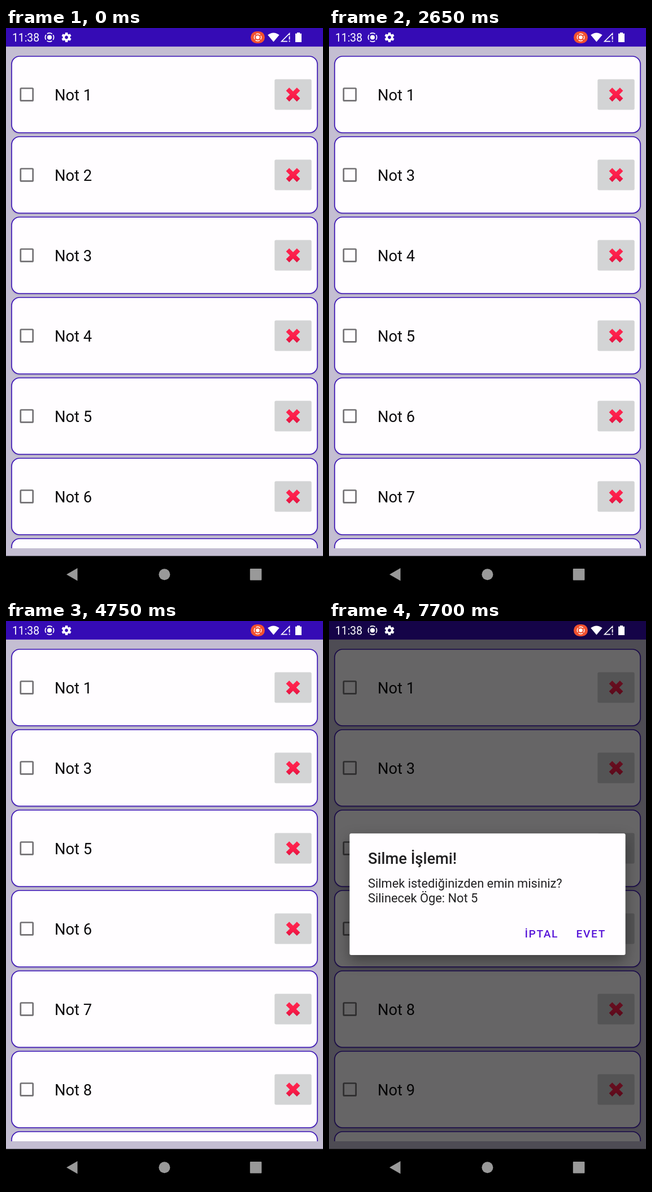
An HTML page that plays this animation: 561 by 998 pixels, repeating every 8000 ms.

```html
<!DOCTYPE html>
<html lang="tr">
<head>
<meta charset="utf-8">
<title>Notlar</title>
<style>
  html, body { margin: 0; width: 100%; height: 100%; overflow: hidden; background: #000; }
  svg { display: block; width: 100vw; height: 100vh; }
  text { font-family: Roboto, sans-serif; white-space: pre; }
  .label { font-size: 27.3px; fill: #0b0a0c; }
  .title { font-size: 27.3px; font-weight: 500; fill: #212022; }
  .message { font-size: 21.84px; fill: #212022; }
  .action { font-size: 19.1px; font-weight: 500; letter-spacing: .0893em; fill: #5614d8; }
  .clock { font-size: 19.3px; fill: #fff; }
  #panel { filter: drop-shadow(0 10px 12px rgba(0, 0, 0, .38)); }
  .card { filter: drop-shadow(0 1.5px 1px rgba(60, 50, 90, .25)); }
</style>
</head>
<body>
<svg viewBox="0 0 561 998" preserveAspectRatio="none">
  <defs>
    <linearGradient id="red" gradientUnits="userSpaceOnUse" x1="0" y1="-13" x2="0" y2="13">
      <stop offset="0" stop-color="#ff2850"/>
      <stop offset=".6" stop-color="#fb1c49"/>
      <stop offset="1" stop-color="#dc1440"/>
    </linearGradient>
    <clipPath id="listClip"><rect y="33" width="561" height="886"/></clipPath>
    <clipPath id="buttonClip"><rect x="475.3" y="-27" width="65.4" height="54" rx="2.7"/></clipPath>
    <g id="cast" fill="none" stroke="#fff" stroke-width="1.7">
      <circle r="7.6" stroke-dasharray="9.5 2.44" stroke-dashoffset="4.75"/>
      <circle r="3.2" fill="#fff"/>
    </g>
  </defs>

  <rect width="561" height="933" fill="#c4bed2"/>
  <g id="list" clip-path="url(#listClip)"></g>
  <rect width="561" height="32.8" fill="#350bb5"/>
  <rect id="dim" width="561" height="933"/>

  <text class="clock" x="11" y="24">11:38</text>
  <use href="#cast" x="77" y="16.5"/>
  <g transform="translate(107 16.5)" stroke="#fff" fill="none">
    <circle r="4.7" stroke-width="3.6"/>
    <path id="teeth" stroke-width="4.4"/>
  </g>
  <rect x="433" y="6" width="25" height="21" rx="10.5" fill="#f2512f"/>
  <use href="#cast" transform="translate(445.5 16.5) scale(.82)"/>
  <path d="M463.2 12.2Q473.4 4.6 483.6 12.2L473.4 24.6Z" fill="#fff"/>
  <path d="M498 23.6H487.6L501.6 9.6V13" fill="none" stroke="#fff" stroke-width="1.6"/>
  <path d="M501.6 14.5V20.5M501.6 22.3V24.4" stroke="#fff" stroke-width="1.9"/>
  <path d="M515 8H520V9.8H523V25H512V9.8H515Z" fill="#fff"/>

  <g id="dialog">
    <rect id="panel" x="36.4" y="375.3" width="488.2" height="214.6" rx="3" fill="#fffdff"/>
    <rect id="confirm" x="427" y="527.5" width="74" height="49" rx="5" fill="#5614d8"/>
    <text class="title" x="69" y="428.7">Silme İşlemi!</text>
    <text class="message" x="69" y="471.3">Silmek istediğinizden emin misiniz?</text>
    <text class="message" x="69" y="496.8" id="item"></text>
    <text class="action" x="346.5" y="559">İPTAL</text>
    <text class="action" x="437.5" y="559">EVET</text>
  </g>

  <rect y="932.6" width="561" height="65.4"/>
  <g fill="#999">
    <path d="M107 965.3L126.5 954V976.6Z"/>
    <circle cx="280.4" cy="965.3" r="10"/>
    <rect x="431.8" y="955" width="20.6" height="20.6" rx="1"/>
  </g>
</svg>
<script>
const LOOP = 8000, ROWS = 7, PITCH = 142, FRAME = 50;
const RIPPLE = 250, DIALOG_STEP = 100, DISMISS_DELAY = 150, DISMISS = 100;

// Each tap: button press, dialog opening and fully open, confirmation.
const taps = [
  { note: 2, press: 100, open: 600, opened: 900, confirm: 1250 },
  { note: 4, press: 2650, open: 3050, opened: 3250, confirm: 3650 },
  { note: 6, press: 4750, open: 5100, opened: 5400, confirm: 5800 },
  { note: 5, press: 6900, open: 7400, opened: 7700, confirm: Infinity },
];

const $ = id => document.getElementById(id);
const clamp = v => Math.max(0, Math.min(1, v));

$('teeth').setAttribute('d', Array.from({ length: 6 }, (_, i) => {
  const a = (i + .5) * Math.PI / 3, x = Math.cos(a), y = Math.sin(a);
  return `M${x * 5} ${y * 5}L${x * 8.6} ${y * 8.6}`;
}).join(''));

$('list').innerHTML = Array.from({ length: ROWS }, (_, i) => `
  <g transform="translate(0 ${117.4 + i * PITCH})">
    <rect class="card" x="10" y="-67.4" width="541" height="135" rx="14"
      fill="#fffdff" stroke="#3a12b6" stroke-width="1.6"/>
    <rect x="25.8" y="-10.9" width="21.9" height="21.9" rx="1.2"
      fill="none" stroke="#737174" stroke-width="2.7"/>
    <text class="label" x="86" y="10.5"></text>
    <rect x="475.3" y="-27" width="65.4" height="54" rx="2.7" fill="#d3d4d5"/>
    <g clip-path="url(#buttonClip)"><circle class="ripple" cx="508" r="0"/></g>
    <path transform="translate(508 .2)" d="M-9.6-9.6L9.6 9.6M9.6-9.6L-9.6 9.6"
      stroke="url(#red)" stroke-width="8"/>
  </g>`).join('');

const labels = [...document.querySelectorAll('.label')];
const ripples = [...document.querySelectorAll('.ripple')];

function openness(tap, t) {
  if (t < tap.open) return 0;
  const steps = (tap.opened - tap.open) / DIALOG_STEP + 1;
  return clamp((Math.floor((t - tap.open) / DIALOG_STEP) + 1) / steps);
}

function render(time) {
  const t = Math.floor(time / FRAME) * FRAME;
  const removed = taps.filter(tap => t >= tap.confirm + DISMISS_DELAY).map(tap => tap.note);
  const notes = [];
  for (let n = 1; notes.length < ROWS; n++) if (!removed.includes(n)) notes.push(n);
  labels.forEach((label, i) => { label.textContent = 'Not ' + notes[i]; });

  const tap = taps.findLast(tap => t >= tap.press);
  const open = tap ? openness(tap, t) : 0;
  const dismissing = tap && t >= tap.confirm + DISMISS_DELAY;
  const closed = dismissing && t >= tap.confirm + DISMISS_DELAY + DISMISS;
  const remaining = closed ? 0 : dismissing ? .5 : 1;

  const pressed = tap ? notes.indexOf(tap.note) : -1;
  ripples.forEach((ripple, i) => {
    const grow = i === pressed ? clamp((t - tap.press) / RIPPLE) : 0;
    ripple.setAttribute('r', 44 * grow);
    ripple.setAttribute('opacity', .12 * (1 - open));
  });

  const scale = dismissing ? 1 : 1 - .1 * (1 - open) ** 3;
  $('dim').setAttribute('opacity', .6 * open * remaining);
  $('dialog').setAttribute('opacity', (1 - (1 - open) ** 2) * remaining);
  $('dialog').setAttribute('transform',
    `translate(280.5 482.6) scale(${scale}) translate(-280.5 -482.6)`);
  $('confirm').setAttribute('opacity', tap && t >= tap.confirm ? .12 : 0);
  $('item').textContent = 'Silinecek Öge: Not ' + (tap ? tap.note : '');
}

const start = performance.now();
function tick() {
  render((performance.now() - start) % LOOP);
  requestAnimationFrame(tick);
}
tick();
</script>
</body>
</html>
```
